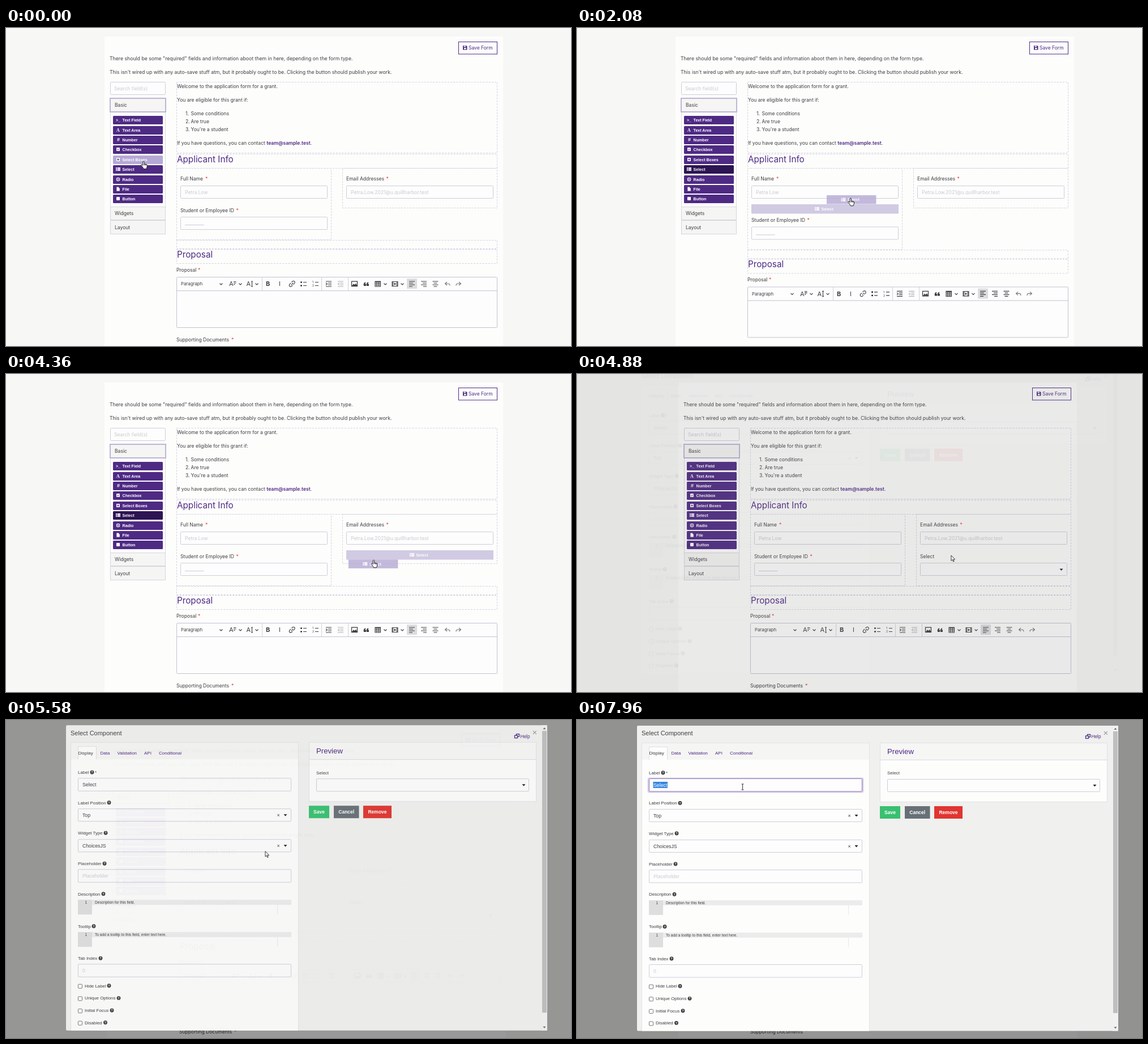
Animation of 998 by 561 pixels, one loop 8 s. Source, as an HTML page:

```html
<!DOCTYPE html>
<html lang="en">
<head>
<meta charset="utf-8">
<title>Form builder</title>
<style>
  html, body { margin: 0; width: 100%; height: 100%; overflow: hidden; background: #f7f7f6; }
  svg { display: block; width: 100vw; height: 100vh; }
  text { fill: #403c40; font: 8.56px Inter, sans-serif; }
  .arial { font-family: "Liberation Sans", Arial, sans-serif; }
  .bold { font-weight: 700; }
  .hint { fill: #cbc9cf; }
  .purple { fill: #4e2a84; }
  .white { fill: #fff; }
  .red { fill: #e33; }
  .line { fill: none; stroke: #403c40; stroke-width: 1.1; }
  .dash { fill: none; stroke: #d6d2e4; stroke-dasharray: 3.2 2; }
  .box { fill: #fdfdfd; stroke: #d0cdda; }
</style>
</head>
<body>
<svg id="stage" viewBox="0 0 998 561" preserveAspectRatio="none"></svg>
<script>
const PURPLE = '#4e2a84', LAVENDER = '#b5a9d4', DARK = '#2d1452', INK = '#403c40';
const PERIOD = 8000, DRAG = 1120, DROP = 4560, OPEN = 4710, OPEN_TIME = 1120, SLIDE = 25;
const PUSH_FROM = 1540, PUSH_TO = 2260, PUSH = 17.4;

// Text is placed by the middle of its capitals.
const text = (x, y, s, cls = '', size = 8.56, extra = '') =>
  `<text x="${x}" y="${y + size * .36}" class="${cls}" style="font-size:${size}px" ${extra}>${s}</text>`;
const arial = (x, y, s, size = 7.9, cls = '', extra = '') => text(x, y, s, 'arial ' + cls, size, extra);
const rect = (x, y, w, h, attrs) => `<rect x="${x}" y="${y}" width="${w}" height="${h}" ${attrs}/>`;
const path = (d, attrs = 'class="line"') => `<path d="${d}" ${attrs}/>`;
const group = (id, body, attrs = '') => `<g id="${id}" ${attrs}>${body}</g>`;
const box = (x, y, w, h, extra = '') => rect(x + .5, y + .5, w - 1, h - 1, `class="box" rx="1" ${extra}`);
const dashed = (x, y, w, h, id = '') => rect(x + .5, y + .5, w - 1, h - 1, `class="dash" ${id && `id="${id}"`}`);
const chevron = (x, y) => path(`M${x - 2.5} ${y - 1}l2.5 2.5l2.5-2.5`);
const caret = (x, y) => path(`M${x - 3} ${y - 1.5}h6l-3 3.4z`, 'fill="#222"');
const required = x => `<tspan class="red" x="${x}">*</tspan>`;

const icons = {
  prompt: x => arial(x - 4, 0, '&gt;_', 7, 'bold white'),
  letter: x => `<text x="${x - 3}" y="2.8" class="white bold" style="font:700 8px Liberation Serif,serif">A</text>`,
  hash: x => arial(x - 2, 0, '#', 9, 'bold white'),
  check: x => rect(x - 3, -3, 6, 6, 'rx="1" fill="#fff"') + path(`M${x - 1.7} 0l1.3 1.4l2.2-2.6`, `fill="none" stroke="${PURPLE}"`),
  plus: x => rect(x - 3, -3, 6, 6, 'rx="1" fill="#fff"') + path(`M${x - 2} 0h4M${x} -2v4`, `stroke="${PURPLE}"`),
  list: x => path(`M${x - 4} -2.2h1.8m.8 0h5.4M${x - 4} 0h1.8m.8 0h5.4M${x - 4} 2.2h1.8m.8 0h5.4`, 'stroke="#fff" stroke-width="1.7"'),
  radio: x => `<circle cx="${x}" r="2.7" fill="none" stroke="#fff" stroke-width="1.1"/><circle cx="${x}" r="1.1" fill="#fff"/>`,
  file: x => path(`M${x - 2.6} -3.4h3l2.4 2.4v4.4h-5.4z`, 'fill="#fff"'),
  square: x => rect(x - 3, -3, 6, 6, 'rx="1" fill="#fff"')
};
const chipLabel = (x, icon, name) => icons[icon](x) + arial(x + 7.6, 0, name, 7.1, 'bold white');

const chips = [['prompt', 'Text Field'], ['letter', 'Text Area'], ['hash', 'Number'], ['check', 'Checkbox'],
  ['plus', 'Select Boxes'], ['list', 'Select'], ['radio', 'Radio'], ['file', 'File'], ['square', 'Button']];

function sidebar() {
  const header = (y, h, s) => rect(184.5, y + .5, 97, h - 1, 'fill="#f5f5f4" stroke="#d8d5df"') + text(192, y + h / 2, s);
  return box(184, 95, 98, 23) + text(191, 106.5, 'Search field(s)', 'hint') +
    rect(184.5, 148.5, 97, 168, 'fill="#fdfdfd" stroke="#dddae3"') +
    rect(184, 124, 98, 24, 'fill="#f5f5f4" stroke="#b9aed3" stroke-width="1.8"') + text(192, 135.5, 'Basic') +
    chips.map(([icon, name], i) => `<g transform="translate(0 ${Math.round(162.1 + i * 17.42)})">` +
      rect(189, -7, 88, 15, `id="chip${i}" rx="1.5" fill="${PURPLE}"`) + chipLabel(198, icon, name) + '</g>').join('') +
    header(315, 24, 'Widgets') + header(339, 25, 'Layout');
}

function toolbar() {
  const rows = (x, widths, align) => path(widths.map((w, i) =>
    `M${x + (align === 'r' ? 5 - w : align === 'c' ? -w / 2 : -5)} ${447 + i * 3}h${w}`).join(''));
  const light = 'class="line" opacity=".4"', half = 'class="line" opacity=".7"';
  const arrow = 'M0-3l-3.5 3l3.5 3M-3 0h5q3 0 3 3.5';
  return rect(301.5, 439.5, 566, 89, 'rx="1" class="box" style="stroke:#c5c1d2"') + path('M301 463.5h567', 'stroke="#c5c1d2"') +
    rect(708, 442, 18, 18, 'fill="#dddcde" rx="1"') +
    path('M452.5 439v24M557.5 439v24M604.5 439v24', 'stroke="#d3d0dc"') +
    text(309, 451.5, 'Paragraph', '', 7.8) + [380, 414, 443, 670, 700].map(x => chevron(x, 451.5)).join('') +
    text(394, 451.5, 'A', '', 11) + path('M402 447.5h4.5M402 450h4.5M402 452.5h2.5') +
    text(424.5, 451.5, 'A', '', 11) + path('M434.5 447v9M433 447h3M433 456h3') +
    text(459, 451.5, 'B', 'bold', 11) + text(482, 451.5, 'I', '', 11, 'font-style="italic"') +
    path('M504 453l3-3M503 450l-2 2q-1.5 2 0 3.5t3.5 0l1.5-1.5M504.5 448.5l1.5-1.5q2-1.5 3.5 0t0 3.5l-2 2') +
    path('M525 448.5h6M525 454.5h6') + '<circle cx="521.5" cy="448.5" r="1.3"/><circle cx="521.5" cy="454.5" r="1.3"/>' +
    path('M546 448.5h6M546 454.5h6') + text(541, 448.5, '1', '', 5) + text(541, 454.5, '2', '', 5) +
    path('M565 447h10M569 450h6M569 453h6M565 456h10M565 449.5l2.5 2l-2.5 2') +
    path('M586 447h10M590 450h6M590 453h6M586 456h10M589 449.5l-2.5 2l2.5 2', light) +
    rect(610.5, 447, 10, 8.5, `fill="none" stroke="${INK}" stroke-width="1.3"`) + path('M611 455l3-4l2 2l2-2.5l2.5 4.5z', `fill="${INK}"`) +
    path('M632 455q-1.5-5 3-7v2.3l-1 1.2h2v3.5zM637 455q-1.5-5 3-7v2.3l-1 1.2h2v3.5z', `fill="${INK}"`) +
    path('M652 447h9.5v9h-9.5zM652 448h9.5M652 450.5h9.5M652 453.3h9.5M655 448v8M658.5 448v8') +
    path('M682 447.5h10v8h-10zM683.5 447.5v8M690.5 447.5v8') + path('M685.5 449.3l4 2.2l-4 2.2z', `fill="${INK}"`) +
    rows(717, [10, 7, 10, 6]) + rows(738, [10, 7, 10, 6], 'r') + rows(758.5, [10, 6, 10, 6], 'c') +
    `<g transform="translate(779 451)">${path(arrow, half)}</g><g transform="translate(800 451) scale(-1 1)">${path(arrow, half)}</g>`;
}

function page() {
  const floppy = path('M807 31h6l1.5 1.5v6h-7.5z', `fill="${PURPLE}"`) + rect(808.5, 31.6, 3.6, 1.9, 'fill="#fff"') + rect(809, 35, 3.6, 2.4, 'fill="#fff"');
  const heading = (y, s) => dashed(301, y - 9.5, 567, 26) + text(302, y, s, 'purple', 15.25);
  return rect(174, 15, 704, 550, 'fill="#fdfdfc"') +
    rect(799.5, 24.5, 68, 21.5, `fill="none" stroke="${PURPLE}"`) + floppy + text(817, 35, 'Save Form', 'purple', 8.5) +
    text(183, 53.5, 'There should be some "required" fields and information aboot them in here, depending on the form type.', '', 8.7) +
    text(183, 77.5, "This isn't wired up with any auto-save stuff atm, but it probably ought to be. Clicking the button should publish your work.", '', 8.7) +
    sidebar() + dashed(301, 95, 567, 126) +
    text(302, 103, 'Welcome to the application form for a grant.') + text(302, 127, 'You are eligible for this grant if:') +
    ['Some conditions', 'Are true', "You're a student"].map((s, i) =>
      text(317, 151 + i * 14.2, `${i + 1}.`) + text(326.5, 151 + i * 14.2, s)).join('') +
    text(302, 203, 'If you have questions, you can contact <tspan class="purple" font-weight="600">team@sample.test</tspan>.') +
    heading(231.5, 'Applicant Info') +
    dashed(301, 247, 274, 127, 'leftColumn') + dashed(594, 247, 274, 71, 'rightColumn') +
    text(308, 266, 'Full Name ' + required(352)) + box(308, 278, 260, 23) + text(316, 289.5, 'Petra Low', 'hint') +
    text(601, 266, 'Email Addresses ' + required(671.5)) + box(601, 278, 260, 23) +
    text(609, 289.5, 'Petra.Low.2021@u.quillharbor.test', 'hint') +
    group('dropped', text(601, 321.5, 'Select') + box(601, 333, 260, 23) + caret(850.5, 345)) +
    group('slot', rect(0, 0, 260, 16.5, `fill="${LAVENDER}"`) + `<g transform="translate(0 8)">${chipLabel(116, 'list', 'Select')}</g>`, 'opacity=".6"') +
    group('lower',
      text(308, 321.5, 'Student or Employee ID ' + required(406.5)) + box(308, 333, 260, 23) +
      path('M316 347.5h33.5', 'stroke="#cbc9cf"') + dashed(301, 374, 567, 16) + heading(399.5, 'Proposal') +
      text(301, 427, 'Proposal ' + required(339)) + toolbar() +
      text(301, 549.5, 'Supporting Documents ' + required(398)));
}

function dialog() {
  const help = (x, y) => `<circle cx="${x}" cy="${y}" r="3.4" fill="#3c3c3c"/>` + arial(x, y, '?', 5.6, 'bold white', 'text-anchor="middle"');
  const label = (y, s, x) => arial(127, y, s) + help(x, y);
  const dropdown = (y, s) => box(127, y - 11.5, 377, 23) + arial(135, y, s, 8.7) + arial(478.5, y, '×', 9) + caret(493.5, y);
  const code = (y, s) => rect(127, y, 377, 9, 'fill="#ececec"') + rect(127, y, 25, 26, 'fill="#dedede"') +
    path(`M479.5 ${y + 9}v17`, 'stroke="#e8e8e8"') + arial(139.5, y + 4.7, '1', 6.6) + arial(157, y + 4.7, s, 6.6);
  const check = (y, s, x) => rect(127.5, y - 2.5, 7, 7, 'rx="1" fill="#fff" stroke="#777"') + arial(139, y, s) + help(x, y);
  const button = (x, w, s, color) => rect(x, 152, w, 22, `fill="${color}"`) + arial(x + w / 2, 163.2, s, 8.5, 'bold white', 'text-anchor="middle"');
  return rect(106, 10, 850, 538.5, 'rx="2" fill="#f0f0ef"') +
    arial(114, 23.5, 'Select Component', 11) +
    rect(114.5, 40.5, 402, 507.5, 'fill="#f5f5f4" stroke="#e4e3e6"') + rect(115, 70, 401, 478.5, 'fill="#fdfdfc"') +
    path('M127.5 70v-22.5h32v22.5', 'fill="#fdfdfc" stroke="#e0dee4"') +
    arial(127.5, 58.5, 'Display', 8) +
    [[166.5, 'Data'], [196.5, 'Validation'], [244, 'API'], [270, 'Conditional']].map(([x, s]) => arial(x, 58.5, s, 8, 'purple')).join('') +
    label(93, 'Label', 152) + arial(157, 93, '*') +
    rect(126, 103, 379, 24, 'id="glow" rx="2" fill="none" stroke="#d9d0ea" stroke-width="3"') +
    box(127, 103, 377, 23.5, 'id="labelBox"') + rect(134.5, 109, 25.5, 11, 'id="marked" fill="#3586e0"') +
    arial(135, 115, 'Select', 8.8, '', 'id="labelText"') +
    label(146.5, 'Label Position', 182) + dropdown(168.5, 'Top') +
    label(200, 'Widget Type', 176) + dropdown(222.5, 'ChoicesJS') +
    label(254, 'Placeholder', 174) + box(127, 264, 377, 23.5) + arial(135, 276, 'Placeholder', 8.7, 'hint') +
    label(307.5, 'Description', 172) + code(318, 'Description for this field.') +
    label(364.5, 'Tooltip', 155) + code(375, 'To add a tooltip to this field, enter text here.') +
    label(421, 'Tab Index', 167) + box(127, 431, 377, 23.5) + arial(135, 443, '0', 8.7, 'hint') +
    check(469.5, 'Hide Label', 182) + check(491.3, 'Unique Options', 199) + check(513, 'Initial Focus', 187) + check(534.5, 'Disabled', 175.5) +
    rect(535.5, 40.5, 401, 104, 'fill="#fdfdfc" stroke="#e2e0e5"') + rect(536, 41, 400, 29, 'fill="#f6f6f5"') + path('M536 70.5h400', 'stroke="#d9d6df"') +
    arial(548, 55.5, 'Preview', 13.2, 'purple') + arial(548, 93.5, 'Select') + box(548, 104, 376, 23) + caret(914.5, 115.5) +
    button(535, 36, 'Save', '#39c070') + button(579, 44.5, 'Cancel', '#687077') + button(631, 50, 'Remove', '#e03530') +
    rect(901.5, 25.5, 5, 4.5, `fill="none" stroke="${PURPLE}" stroke-width="1.3"`) + rect(898.5, 28, 5, 4.5, `fill="#f0f0ef" stroke="${PURPLE}" stroke-width="1.3"`) +
    arial(908.5, 29.5, 'Help', 8.3, 'purple') + arial(929.5, 22.5, '×', 15, '', 'opacity=".5"') +
    rect(946, 10, 10, 538.5, 'fill="#f1f1f1"') + rect(947, 20, 8, 497, 'fill="#bfbfbf"') +
    path('M948.5 17h5l-2.5-3zM948.5 541.5h5l-2.5 3z', 'fill="#666"');
}

const cursors =
  group('hand', path('M-1.2 .8Q0-.9 1.2 .8V5l3.9 .7q1.5 .4 1.4 2l-.7 3.3l-.8 2.5h-5l-1-2.3l-3.3-4q-.2-1.6 1.3-1.2l1.8 1.5z', 'fill="#fff" stroke="#222"') +
    path('M1.2 5v2.2M3.1 5.5v2M5 6v1.8', 'class="line" stroke-width=".7"')) +
  group('arrow', path('M0 0V9.5L2.2 7.5L3.7 11L5.2 10.4L3.7 7H6.7Z', 'fill="#fff" stroke="#222" stroke-width=".9"')) +
  group('beam', path('M-2-5h1.5l.5 .6l.5-.6h1.5M0-4.5v9M-2 5h1.5l.5-.6l.5 .6h1.5'));

stage.innerHTML =
  rect(0, 0, 998, 561, 'fill="#f7f7f6"') + group('page', page()) +
  group('ghost', rect(0, 0, 87.5, 15.5, `fill="${LAVENDER}"`) + `<g transform="translate(0 7.7)">${chipLabel(29.5, 'list', 'Select')}</g>`, 'opacity=".8"') +
  rect(0, 0, 998, 561, 'id="shade" fill="#000"') + group('dialog', dialog()) + cursors;

const el = id => document.getElementById(id);
const set = (id, name, value) => el(id).setAttribute(name, value);
const show = (id, on) => set(id, 'visibility', on ? 'visible' : 'hidden');
const move = (id, x, y) => set(id, 'transform', `translate(${x} ${y})`);

const pointerTrack = [[0, 243, 235], [450, 237, 245], [1000, 232, 247], [1240, 254, 247], [1560, 322, 266], [2200, 520, 308],
  [2650, 626, 331], [2960, 640, 334], [4080, 643, 333], [4600, 655, 324], [4880, 661, 320], [5020, 653, 317],
  [5200, 619, 303], [5600, 450, 228], [6000, 305, 158], [6450, 293, 122], [6700, 292.5, 118], [8000, 292.5, 118]];
const ghostTrack = [[0, 189.5, 241.5], [DRAG, 189.5, 241.5], [1240, 191, 241.5], [1560, 270, 260], [2200, 480, 303],
  [2650, 586, 326], [2960, 601, 329], [4080, 604, 328], [8000, 616, 319]];

function along(track, t) {
  const i = track.findIndex(p => p[0] > t);
  const a = track[i - 1], b = track[i], k = (t - a[0]) / (b[0] - a[0]);
  return [a[1] + (b[1] - a[1]) * k, a[2] + (b[2] - a[2]) * k];
}

// The CSS "ease" curve, solved for time by bisection.
function ease(x) {
  if (x <= 0 || x >= 1) return x <= 0 ? 0 : 1;
  const bezier = (s, a, b) => 3 * s * (1 - s) ** 2 * a + 3 * s * s * (1 - s) * b + s ** 3;
  let lo = 0, hi = 1;
  for (let i = 0; i < 20; i++) {
    const mid = (lo + hi) / 2;
    if (bezier(mid, .25, .25) < x) lo = mid; else hi = mid;
  }
  return bezier(lo, .1, 1);
}

function draw() {
  const t = performance.now() % PERIOD;
  const dragging = t >= DRAG && t < DROP;
  const inLeft = t >= PUSH_FROM && t < PUSH_TO;
  const inRight = t >= PUSH_TO && t < DROP;
  const push = inLeft ? PUSH : 0;

  move('page', t >= OPEN ? 5 : 0, 0);
  move('lower', 0, push);
  set('leftColumn', 'height', 126 + push);
  set('rightColumn', 'height', t >= DROP ? 126 : inRight ? 87 : 70);
  show('slot', inLeft || inRight);
  move('slot', inLeft ? 308 : 601, 311);
  show('dropped', t >= DROP);
  set('chip4', 'fill', t < 350 ? LAVENDER : PURPLE);
  set('chip5', 'fill', dragging ? DARK : t >= 350 && t < DRAG ? LAVENDER : PURPLE);
  show('ghost', dragging);
  move('ghost', ...along(ghostTrack, t));

  // The dialog fades in a little behind its backdrop.
  const p = ease((t - OPEN) / OPEN_TIME);
  set('shade', 'opacity', .41 * p);
  set('dialog', 'opacity', p ** 1.7);
  move('dialog', 0, -SLIDE * (1 - p));

  const focused = t >= 6800, selected = t >= 7150;
  show('glow', focused);
  el('labelBox').style.stroke = focused ? '#8d79b8' : '';
  show('marked', selected);
  el('labelText').style.fill = selected ? '#fff' : '';

  const kind = t < DROP || (t >= 5850 && t < 6200) ? 'hand' : t >= 6450 ? 'beam' : 'arrow';
  for (const id of ['hand', 'arrow', 'beam']) {
    show(id, id === kind);
    move(id, ...along(pointerTrack, t));
  }
  requestAnimationFrame(draw);
}
draw();
</script>
</body>
</html>
```
